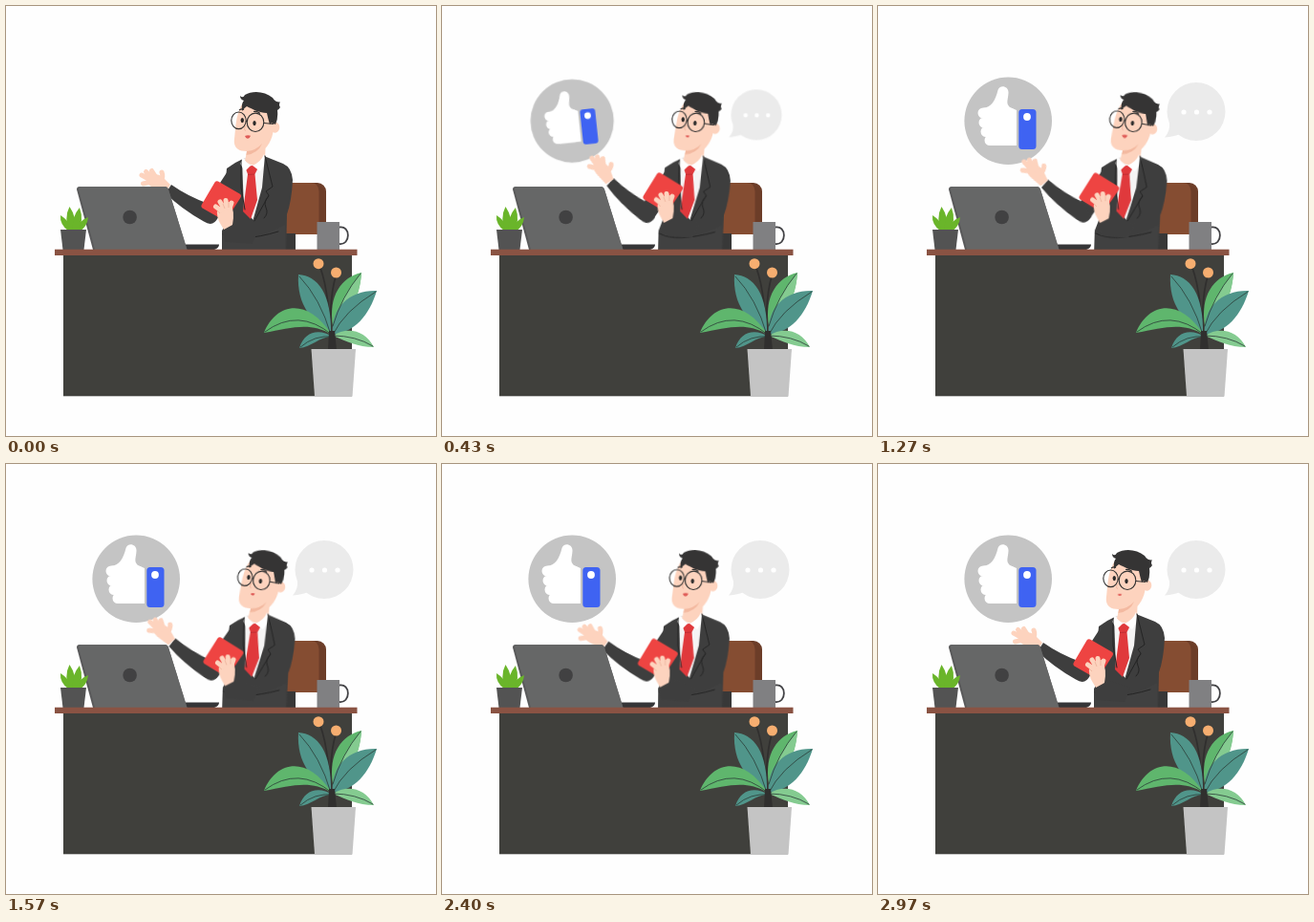
These frames come from a looping animation (450x450 px, 3000 ms). An HTML page:

```html
<!DOCTYPE html>
<html lang="en">
<head>
<meta charset="utf-8">
<title>Office desk</title>
<style>
html, body { margin: 0; width: 100%; height: 100%; overflow: hidden; background: #fefefe; }
svg { display: block; width: 100%; height: 100%; }
.skin { fill: #fdd3be; }
.skin-line { stroke: #fdd3be; stroke-width: 5; stroke-linecap: round; fill: none; }
.suit { fill: #3e3e3e; }
.fold { fill: none; stroke: #242424; stroke-width: 1; stroke-linecap: round; stroke-linejoin: round; }
.hair { fill: #353434; }
.teal { fill: #50958a; }
.green { fill: #5fb66d; }
.light { fill: #84cb90; }
.vein { fill: none; stroke: #2b3d38; stroke-width: .8; stroke-linecap: round; }

.torso, .head, .forearm, .palm, .book, .grip, .like, .thumb, .bubble, .mouth {
  animation: 3s ease-in-out infinite;
}
.torso { transform-origin: 262px 262px; animation-name: lean; }
.head { transform-origin: 262px 163px; animation-name: nod; }
.forearm { transform-origin: 212px 221px; animation-name: lift; }
.palm { transform-origin: 169px 191px; animation-name: wave; }
.book { animation-name: book; }
.grip { animation-name: grip; }
.like { transform-origin: 136px 120px; animation-name: pop; animation-timing-function: cubic-bezier(.3, 0, .3, 1); }
.thumb { transform-origin: 133px 124px; animation-name: thumb; }
.bubble { transform-origin: 302px 137px; animation-name: pop-late; animation-timing-function: cubic-bezier(.3, 0, .3, 1); }
.mouth { transform-origin: 253px 137px; animation-name: talk; }

@keyframes lean {
  0%, 99%, 100% { transform: none; }
  22%, 53% { transform: rotate(1.8deg); }
}
@keyframes nod {
  0%, 99%, 100% { transform: none; }
  22%, 53% { transform: rotate(2.8deg); }
}
@keyframes lift {
  0%, 100% { transform: none; }
  14.3% { transform: rotate(7.5deg); }
  27.7% { transform: rotate(3.4deg); }
  42.3% { transform: rotate(4deg); }
  63.3% { transform: rotate(1.6deg); }
  80% { transform: rotate(.7deg); }
}
@keyframes wave {
  0%, 100% { transform: none; }
  14.3% { transform: rotate(17deg); }
  27.7% { transform: rotate(12deg); }
  42.3% { transform: rotate(14deg); }
  63.3% { transform: rotate(8deg); }
  80% { transform: rotate(3deg); }
}
@keyframes book {
  0%, 57%, 100% { transform: none; }
  27.7% { transform: translate(8.5px, -15px); }
}
@keyframes grip {
  0%, 57%, 100% { transform: none; }
  27.7% { transform: translate(6.5px, -12px); }
}
@keyframes pop {
  0%, 1% { transform: scale(0); }
  18.7%, 100% { transform: scale(1); }
}
@keyframes pop-late {
  0%, 4.6% { transform: scale(0); }
  20.3%, 100% { transform: scale(1); }
}
@keyframes thumb {
  0%, 14.3% { transform: rotate(-6deg) scale(.92); }
  27.7% { transform: rotate(-3deg); }
  40%, 100% { transform: none; }
}
@keyframes talk {
  0%, 28%, 42%, 80% { transform: none; }
  14%, 35%, 55%, 72%, 90%, 100% { transform: scale(.75, .6); }
  63% { transform: scale(.9); }
}
</style>
</head>
<body>
<svg viewBox="0 0 450 450" role="img" aria-label="Man talking at his desk">
  <g class="like">
    <circle cx="136.200" cy="120.300" r="45.800" fill="#c4c4c4"/>
    <g class="thumb">
      <path fill="#fff" d="M110 107C119 106 123 98 125.500 88C127 82 137 83 136.500 91C136 99 133.500 102 138 106L145 109V146H119Z"/>
      <path fill="none" stroke="#fff" stroke-width="11" stroke-linecap="round" d="M110 112H138M111 122H138M113 131.500H138M117 140.500H138"/>
      <rect x="147.300" y="108" width="18.200" height="42" rx="3.500" fill="#3f63f2"/>
      <circle cx="156" cy="116" r="3.900" fill="#fff"/>
    </g>
  </g>

  <g class="bubble">
    <circle cx="333" cy="110.500" r="30.500" fill="#ebebeb"/>
    <path d="M305 122Q306 131 300 137.500Q310 136.500 316 134Z" fill="#ebebeb"/>
    <g fill="#fff"><circle cx="320" cy="111" r="2.600"/><circle cx="333.500" cy="111" r="2.600"/><circle cx="347" cy="111" r="2.600"/></g>
  </g>

  <rect x="284" y="185" width="51" height="54" rx="9" fill="#6c3d28"/>
  <path d="M288 185H319Q327 185 327.500 194V239H288Z" fill="#854d32"/>
  <path d="M286 238H303V255H286Z" fill="#383838"/>

  <g class="torso">
    <path class="suit" d="M242 174L214 217" stroke="#3e3e3e" stroke-width="18" stroke-linecap="round"/>
    <path class="suit" d="M240 164L248 160L270 157L290 165Q299 169 300 182Q299 204 294 218L293 264H226V236L230 225C233 205 229 184 231 170Z"/>
    <path d="M247 160L271 155L274 182L259 224L249 214Z" fill="#f5f4f4"/>

    <g class="head">
      <path class="skin" d="M249 100C243 108 241 118 240 129L238.800 141C238.500 149 244 152 252 152L250 162Q261 172 271 160L271.500 149C277 143 281 134 281 115L276 101Z"/>
      <path d="M252 152Q262 151 268 144Q264 154 251.500 156Z" fill="#f3b9a0"/>
      <ellipse class="skin" cx="281.500" cy="127" rx="4.800" ry="5.800"/>
      <path class="hair" d="M245 94Q248 97 250 93C258 88 271 89 279 96Q282 101 287 100.500Q285 103 287 106Q285 109 284 109Q285 118 282 124Q277 121 276 124Q274 117 273 112C265 112 258 108 252 105Q249 107 247 110Q246 102 249 99Q245 98 245 94Z"/>
      <g fill="#292929"><ellipse cx="247.300" cy="119.600" rx="1.700" ry="2.600"/><ellipse cx="260" cy="122.600" rx="1.700" ry="2.600"/></g>
      <g fill="none" stroke="#303030" stroke-width="1.100">
        <ellipse cx="243.500" cy="119.800" rx="7.700" ry="8.800"/>
        <ellipse cx="261" cy="121.800" rx="8.800" ry="9.700"/>
        <path d="M251 120.500L252.500 121M269.800 122.500L280 123.500M244 109Q247 107 249 108.500M259 110.500Q263 110 266 112.500"/>
      </g>
      <path d="M251 125Q248 130 251 130.500" fill="none" stroke="#eeb49c" stroke-width=".8"/>
      <path class="mouth" d="M250 136Q253 134.500 256 135.800Q255 139 252.800 138.800Q250.800 138.500 250 136Z" fill="#df5b57"/>
    </g>

    <path d="M250 168L262 166.500L263 171L260.500 176L263 203L256 223L248 215L253 176Z" fill="#e0393c"/>
    <path d="M253 176.500L260 176" stroke="#b72a30" stroke-width=".8"/>
    <path d="M248 159Q251 164 256 167L250 173L245 165ZM270 155Q267 163 258 167L266 173L272 163Z" fill="#fff"/>
    <path class="suit" d="M271 156L279 189L272 194L275 198L258 226L268 190Z"/>
    <path class="fold" d="M271 157L279 189L272 194L275 198L260 225M246 162L246 190L250 213"/>
    <path class="fold" stroke-width="2" d="M275 199Q269 204 272 211Q275 217 270 222"/>
    <path d="M227 239Q258 249 292 229V255H227Z" fill="#414141"/>
    <path class="fold" d="M227 239Q245 248 285 236"/>

    <g class="forearm">
      <path class="suit" d="M173 187Q190 199 212 207L222 221Q217 232 207 225.500Q183 212 167 196Z"/>
      <g class="palm">
        <path class="skin" d="M172 187L164 179Q156 173 148 179Q146 187 154 190L167 195Z"/>
        <path class="skin-line" d="M152 184L143.500 186M151 182L142 177M154 181L146.500 173.500M158 181L152.500 172.500M162 183Q165 179 163 174"/>
      </g>
    </g>

    <path class="book" d="M222 183.500L244.500 196.500Q247 198 245.500 200.500L231 223Q229.500 225 227 223.700L205.500 211.500Q203.500 210 205 207.500L218.500 184.500Q220 182.500 222 183.500Z" fill="#ee4442"/>
    <g class="grip">
      <path class="suit" d="M226 235L240 226L264 234L258 249L229 247Z"/>
      <path class="skin" d="M225 229Q220 222 221 212L234 205Q240 214 237 229L228 234Z"/>
      <path class="skin-line" d="M225 214L219.500 210M227 210L224 205M231 210L230 203.500M234 212L236 206"/>
      <path d="M224 217L221 214M229 212L227 207M233 211L233 206" stroke="#e9ad96" stroke-width=".7"/>
    </g>
  </g>

  <path d="M188 249.500H223Q223 253 218 255H188Z" fill="#353537"/>
  <path d="M77 189H166Q169 189 170 192L189.500 255H91L74 192Q74 189 77 189Z" fill="#59595a"/>
  <path d="M79 189H166Q169 189 170 192L189.500 255H93L76 192Q76 189 79 189Z" fill="#666767"/>
  <circle cx="129.600" cy="221" r="7.300" fill="#414142"/>

  <g fill="#6ab52a">
    <path d="M66 236Q56 229 57 219Q67 225 70 236Z"/>
    <path d="M72 236Q75 225 86 221Q85 231 77 236Z"/>
    <path d="M67 236Q60 222 66.500 210Q74 221 73 236Z"/>
    <path d="M70 236Q68 221 77 211Q82 225 75 236Z"/>
  </g>
  <path d="M57 234H84L81.500 255H59.500Z" fill="#535353"/>

  <path d="M348.500 231.500C361 229 361 251 348.500 249" fill="none" stroke="#424245" stroke-width="1.800"/>
  <path d="M325.500 226H349V255H325.500Z" fill="#808082"/>

  <rect x="60" y="260" width="302" height="148.300" fill="#40403c"/>
  <rect x="51" y="254.700" width="316.500" height="6.300" fill="#8a5343"/>

  <path d="M329 274Q339 302 340 360M345 283Q337 310 341 360M341 360Q342 340 357 322" fill="none" stroke="#302f2e" stroke-width="1.700"/>
  <g fill="#f6ae70"><circle cx="327" cy="269.700" r="5.500"/><circle cx="345.500" cy="279" r="5.500"/></g>
  <path class="teal" d="M306 281C326 282 341 301 340 344C321 330 304 314 306 281Z"/>
  <path class="green" d="M372 279C351 284 337 303 342 335C359 323 370 307 372 279Z"/>
  <path class="light" d="M372 279Q351 304 342 335C359 323 370 307 372 279Z"/>
  <path class="teal" d="M388 298C361 297 339 315 342 344C365 341 380 324 388 298Z"/>
  <path class="green" d="M270 342C282 312 314 303 341 344C318 330 299 337 270 342Z"/>
  <path class="teal" d="M307 358C312 341 327 337 342 346C329 345 320 357 307 358Z"/>
  <path class="light" d="M342 345C357 335 376 339 385 357C368 357 357 351 342 345Z"/>
  <path class="vein" d="M307 283Q329 306 340 344M371 280Q351 304 342 335M387 299Q354 319 342 344M271 341Q306 315 341 344M308 357Q323 344 342 346M342 345Q366 345 384 356"/>
  <path d="M338 340H344L346 360H337Z" fill="#302f2e"/>
  <path d="M319.500 359H366L362.500 408.500H323Z" fill="#c4c4c4"/>
</svg>
</body>
</html>
```
